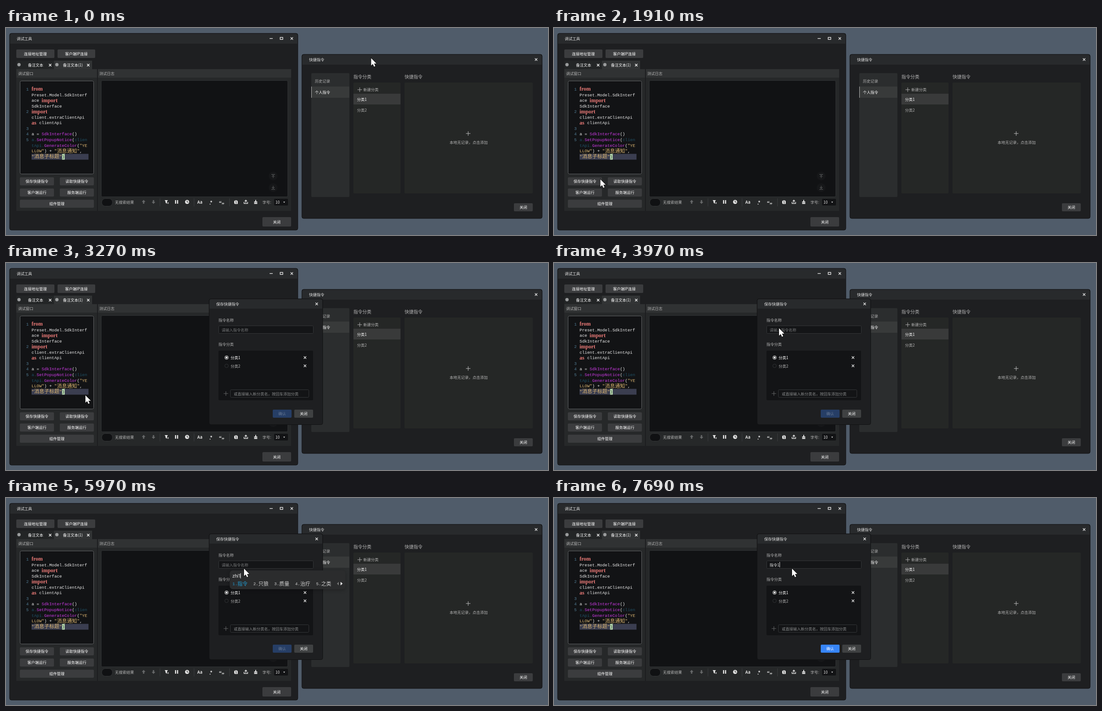
These frames come from a looping animation (1209 by 463 pixels, 8000 ms). An HTML page with a canvas:

```html
<!DOCTYPE html>
<html lang="zh-CN">
<head>
<meta charset="utf-8">
<style>
html, body { margin: 0; width: 100%; height: 100%; overflow: hidden; background: #505c6a; }
canvas { display: block; }
</style>
</head>
<body>
<canvas id="stage" width="1209" height="463"></canvas>
<script>
const g = document.getElementById('stage').getContext('2d');
const SANS = '"Noto Sans CJK SC", "Noto Sans CJK", "Noto Sans", sans-serif';
const MONO = '"Liberation Mono", monospace';
const SERIF = '"Liberation Serif", serif';
const LIGHT = '#e6e6e6', GREY = '#b4b4b4', DIM = '#666869', BUTTON = '#3b3c3e', EDGE = '#343638';
const CELL = 5.64;

function box(x, y, w, h, fill, r = 0, line) {
  g.beginPath();
  g.roundRect(x, y, w, h, r);
  g.fillStyle = fill;
  g.fill();
  if (line) {
    g.strokeStyle = line;
    g.lineWidth = 1;
    g.stroke();
  }
}

function text(s, x, y, color = LIGHT, size = 8.5, align = 'left', font = SANS, weight = 400) {
  g.font = `${weight} ${size}px ${font}`;
  g.textAlign = align;
  g.fillStyle = color;
  g.fillText(s, x, y + size * 0.37);
}

// SVG path relative to x, y; filled when width is 0
function shape(d, x, y, color = LIGHT, width = 0) {
  g.save();
  g.translate(x, y);
  const p = new Path2D(d);
  g.fillStyle = g.strokeStyle = color;
  g.lineWidth = width;
  width ? g.stroke(p) : g.fill(p);
  g.restore();
}

function disc(x, y, r, color, width = 0) {
  shape(`M${-r} 0a${r} ${r} 0 1 0 ${2 * r} 0a${r} ${r} 0 1 0 ${-2 * r} 0`, x, y, color, width);
}

const cross = (x, y, color = LIGHT, w = 1.3, r = 2.7) =>
  shape(`M${-r} ${-r}L${r} ${r}M${r} ${-r}L${-r} ${r}`, x, y, color, w);
const plus = (x, y, color, r = 5) => shape(`M${-r} 0H${r}M0 ${-r}V${r}`, x, y, color, 1);

function button(s, x, y, w, h, fill = BUTTON, color = '#fff') {
  box(x, y, w, h, fill, 2);
  text(s, x + w / 2, y + h / 2, color, 8.5, 'center', SANS, 500);
}

function panel(title, x, y, w, h, bar) {
  box(x, y, w, h, '#1e1f21', 4, '#101112');
  box(x + 1, y + 1, w - 2, bar, '#282a2c', [4, 4, 0, 0]);
  text(title, x + 16, y + 12);
  cross(x + w - 13.5, y + 11.5);
}

const caret = (x, y, h, color = LIGHT) => box(x, y, 1, h, color);

const RED = '#ea7a77', PINK = '#cc3ae4', TEAL = '#1f5065', GOLD = '#dcb672', WHITE = '#ececec';
const CODE = [
  [['from', RED]],
  [['Preset.Model.SdkInterf', WHITE]],
  [['ace ', WHITE], ['import', RED]],
  [['SdkInterface', WHITE]],
  [['import', RED]],
  [['client.extraClientApi', WHITE]],
  [['as', RED], [' clientApi', WHITE]],
  [],
  [['a = ', WHITE], ['SdkInterface', PINK], ['()', WHITE]],
  [['a.', TEAL], ['SetPopupNotice', PINK], ['(', WHITE], ['clien', TEAL]],
  [['tApi.', TEAL], ['GenerateColor', PINK], ['(', WHITE], ['"YE', GOLD]],
  [['LLOW"', GOLD], [') + ', WHITE], ['"', GOLD], ['消息通知', GOLD], ['"', GOLD], [',', WHITE]],
  [['"', GOLD], ['消息子标题', GOLD], ['"', GOLD], [')', '#24332a']]
];
const NUMBERED = [0, 4, 7, 8, 9];

function code() {
  box(31.5, 118.5, 164, 208, '#121315', 3, '#626466');
  box(57, 281.5, 127, 13, '#3b3e50');
  box(125, 281.5, 6, 13, '#b5d7ad');
  CODE.forEach((runs, i) => {
    const y = 136.5 + i * 12.56;
    let x = 57;
    for (const [s, color] of runs) {
      const cjk = s > '\u3000';
      if (color === RED) text(s, x, y - .5, color, 12, 'left', SERIF, 700);
      else text(s, x, y, color, cjk ? 11.28 : 9.4, 'left', cjk ? SANS : MONO);
      x += s.length * (cjk ? 2 : 1) * CELL;
    }
  });
  NUMBERED.forEach((row, i) =>
    text(i + 1, 45, 136.5 + row * 12.56, '#517b92', 9.4, 'left', MONO));
}

function toolbar() {
  box(213.5, 381.5, 24, 17, '#101113', 8, EDGE);
  text('无搜索结果', 243, 390, GREY);
  const up = 'M0-4.5L4 0H1.5V4H-1.5V0H-4Z', down = 'M0 4.5L4 0H1.5V-4H-1.5V0H-4Z';
  shape(up, 307, 389, DIM);
  shape(down, 329, 389, DIM);
  for (const x of [343, 419, 498]) box(x, 381, 1, 18, '#3a3c3e');
  shape('M-4-4H3L1-.5V4L-2 2V-.5ZM2 1H5V2H2ZM2 3H5V4H2Z', 358, 389);
  shape('M-3.5-4H-1V4H-3.5ZM1-4H3.5V4H1Z', 380.5, 389);
  disc(404, 389, 4.6, LIGHT);
  shape('M0-3V.5H3', 404, 389, '#262829', 1.2);
  text('Aa', 432.5, 389.5, LIGHT, 9, 'center', SANS, 700);
  text('.*', 457, 390.5, LIGHT, 11, 'center', SANS, 700);
  text('“', 478, 392, LIGHT, 12, 'center', SERIF, 700);
  text('„', 484, 388.5, LIGHT, 12, 'center', SERIF, 700);
  shape('M-4-3H-2V-4H2L4-2V4H-3V3H-4Z', 513, 389.5);
  shape('M-1.5-2H1.5M-1.5 0H2M-1 2H2', 513, 389.5, '#262829', .8);
  shape('M-4 0V3.5H4V0M0 2V-4M-2.5-1.5L0-4L2.5-1.5', 535, 389, LIGHT, 1.4);
  shape('M-1-4.5H1V-1H3.5V1H-3.5V-1H-1ZM-3.5 1.7H3.5V4.5H-3.5Z', 557, 389);
  text('字号:', 572, 390, GREY);
  box(598, 382, 31, 15, '#121315', 2);
  text('10', 601, 390);
  shape('M-2-1H2L0 1.5Z', 620.5, 389.5);
}

function toolWindow() {
  panel('调试工具', 8, 12, 643, 440, 22);
  shape('M-3.5 0H3.5', 591.5, 23.5, LIGHT, 1.4);
  shape('M-3-2H3V2.5H-3Z', 614.5, 23, LIGHT, 1.3);
  button('连接地址管理', 23, 48, 85, 19);
  button('客户端IP连接', 115, 48, 84, 19);
  box(23, 73, 84, 19, '#232526');
  box(107, 73, 85, 19, '#323435');
  disc(29, 82, 3.7, '#9a9c9d');
  disc(113.5, 82, 3.7, '#9a9c9d');
  text('备注文本', 49, 83, '#fff');
  text('备注文本(1)', 127, 83, '#fff');
  cross(98.5, 83, '#f0f0f0', 1.5);
  cross(183.5, 83, '#f0f0f0', 1.5);

  box(23, 92, 613, 317, '#262829');
  box(23, 92, 613, 19, '#303233');
  box(203, 92, 2, 317, '#1c1d1f');
  text('调试窗口', 27, 101.5, GREY);
  text('测试日志', 208, 101.5, GREY);
  code();
  button('保存快捷指令', 31, 334, 76, 18);
  button('读取快捷指令', 120, 334, 76, 18);
  button('客户端运行', 31, 359, 76, 18);
  button('服务端运行', 120, 359, 76, 18);
  button('组件管理', 31, 384, 165, 18);

  box(212.5, 117.5, 416, 260, '#111214', 3, '#303234');
  disc(596, 331, 10, '#161719');
  disc(596, 357, 10, '#161719');
  shape('M-4-4H4M0 4V-2M-3 1L0-2L3 1', 596, 331.5, DIM, 1);
  shape('M-4 4H4M0-4V2M-3-1L0 2L3-1', 596, 357, DIM, 1);
  toolbar();
  button('关闭', 572, 423, 64, 21);
}

function commandWindow() {
  panel('快捷指令', 660, 59, 536, 367, 22);
  box(681, 101, 85, 277, '#2b2d2e', 2);
  box(681, 131, 85, 25, '#383a3a');
  box(681, 131, 1, 25, '#b8b8b8');
  text('历史记录', 689, 119, GREY);
  text('个人指令', 689, 144, '#fff');
  text('指令分类', 775, 109.5, GREY, 10);
  text('快捷指令', 889, 109.5, GREY, 10);
  box(775, 122, 105, 248, '#252726', 2);
  box(889, 122, 286, 248, '#252726', 2);
  plus(789, 138, GREY);
  text('新建分类', 797, 138, GREY);
  box(775, 147, 105, 24, '#393a3a');
  text('分类1', 783, 159.5, '#fff');
  text('分类2', 783, 184, GREY);
  plus(1031, 236, '#c4c4c4');
  text('本地无记录，点击添加', 1032, 256, GREY, 8.5, 'center');
  button('关闭', 1133, 392, 42, 18);
}

function dialog(t) {
  panel('保存快捷指令', 453, 80, 253.5, 281.5, 21);
  text('指令名称', 474, 128, GREY);
  box(474.5, 140.5, 211, 17, '#141517', 2, EDGE);
  const name = t >= 6570 ? '指令1' : t >= 6370 ? '指令' : '';
  text(name || '请输入指令名称', 481, 149.5, name ? LIGHT : '#77797a');
  const caretOn = t >= 4100 && t < 4640 || t >= 5170 && t < 5570 ||
    t >= 6370 && t < 7160 || t >= 7690;
  if (caretOn) caret(name.length > 2 ? 503 : name ? 498 : 481, 143, 12);

  text('指令分类', 474, 182, GREY);
  box(474, 196, 211, 111, '#131416', 2);
  disc(492, 211.5, 4, '#e8e8e8', 1);
  disc(492, 211.5, 2.3, '#f4f4f4');
  disc(492, 230, 4, '#303234', 1);
  text('分类1', 501, 212, '#fff');
  text('分类2', 501, 230.5, GREY);
  cross(667, 211.5);
  cross(667, 230);
  plus(490.5, 292, DIM);
  box(500.5, 283.5, 175, 17, '#131416', 2, EDGE);
  text('或直接输入新分类名，按回车添加分类', 508, 293, '#8a8c8d');
  if (name) button('确认', 595, 328, 42, 18, '#3785f8');
  else button('确认', 595, 328, 42, 18, '#263e66', '#687993');
  button('关闭', 643, 328, 42, 18, '#3f4142');
}

const TYPED = [
  [5570, 'z', '在 中 这 着 者'],
  [5640, 'zh', '中 这 着 者 只'],
  [5710, 'zhi', '只 之 指 直 至'],
  [5970, "zhi'l", '指令 只狼 质量 治疗 之类'],
  [6100, "zhi'li", '指令 治理 智力 致力 质量'],
  [6170, "zhi'lin", '指令 治林 直临 止淋 之林'],
  [6240, "zhi'ling", '指令 直领 智灵 之灵 只领']
];

function inputMethod(t) {
  const [, typed, list] = TYPED.findLast(e => t >= e[0]);
  const words = list.split(' ');
  const pitch = 24.1 + words[0].length * 2 * CELL;
  const end = 505 + 5 * pitch;
  g.save();
  g.shadowColor = 'rgba(0,0,0,.25)';
  g.shadowBlur = 8;
  g.shadowOffsetY = 2;
  box(499, 162, end - 480, 42, '#2b2c2d', 7);
  g.restore();
  text(typed, 505, 174, '#ececec', 10.5, 'left', '"Liberation Sans", sans-serif');
  caret(505 + g.measureText(typed).width, 168, 12);
  words.forEach((word, i) => {
    const x = 505 + i * pitch, color = i ? '#d0d0d0' : '#219bd0';
    text(i + 1 + '.', x, 192, color, 9.4, 'left', MONO);
    text(word, x + 2 * CELL, 191.5, color, 11.28);
  });
  shape('M4-4V4L0 0Z', end, 191.5, '#777');
  shape('M0-4V4L4.5 0Z', end + 8, 191.5, '#f0f0f0');
}

// start time, number of 70 ms steps, end x, end y
const MOVES = [
  [790, 9, 204, 363], [1420, 3, 153, 338], [1630, 10, 54, 339], [2720, 1, 66, 348],
  [3060, 12, 495, 147], [3900, 2, 502, 146], [4570, 4, 531, 158]
];

function pointer(t) {
  let x = 814.5, y = 67.5;
  for (const [start, steps, toX, toY] of MOVES) {
    if (t < start) break;
    const p = Math.min(steps, Math.floor((t - start) / 70) + 1) / steps;
    const e = p * p * (3 - 2 * p);
    x += (toX - x) * e;
    y += (toY - y) * e;
  }
  const resizing = Math.abs(x - 204) < 4 && y > 92;
  const d = resizing
    ? 'M-11 0L-5.5-5.5V-1.3H5.5V-5.5L11 0L5.5 5.5V1.3H-5.5V5.5Z'
    : 'M0 0V16.5L3.8 13L6.5 19L9.2 17.8L6.6 12H11.8Z';
  shape(d, x, y, '#111', 1.6);
  shape(d, x, y, '#fff');
}

function frame(now) {
  const t = now % 8000;
  box(0, 0, 1209, 463, '#505c6a');
  toolWindow();
  commandWindow();
  if (t >= 2860) dialog(t);
  if (t >= 5570 && t < 6370) inputMethod(t);
  pointer(t);
}

const begin = performance.now();
function loop() {
  frame(performance.now() - begin);
  requestAnimationFrame(loop);
}
loop();
</script>
</body>
</html>
```
